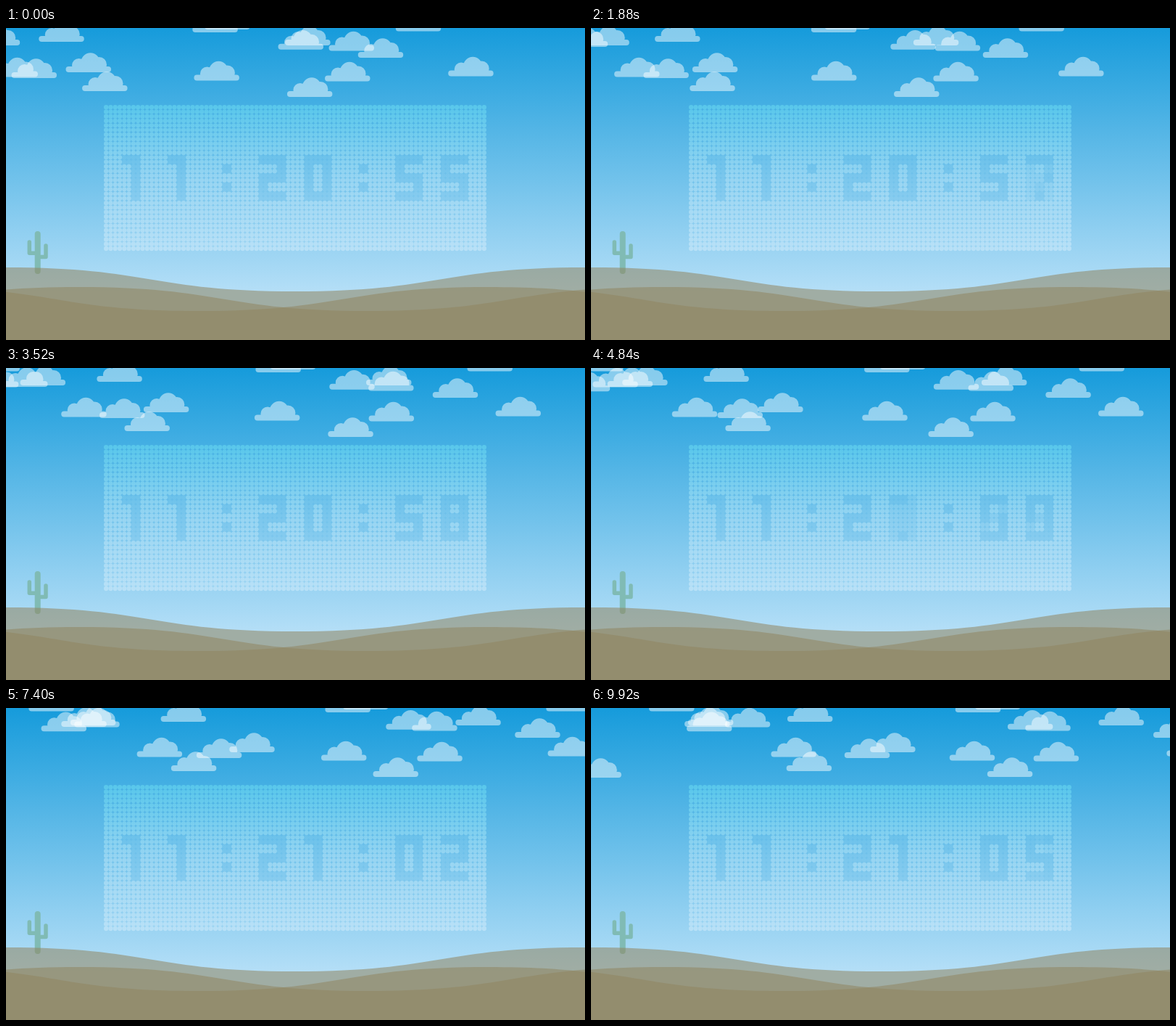
These frames come from a looping animation (799x430 px, 10 s). An HTML page with a canvas:

```html
<!DOCTYPE html>
<html>
<head>
<meta charset="utf-8">
<style>
  html, body { margin: 0; height: 100%; overflow: hidden; }
  canvas { display: block; }
</style>
</head>
<body>
<canvas id="stage" width="799" height="430"></canvas>
<script>
const W = 799, H = 430, LOOP = 10;
const ctx = document.getElementById('stage').getContext('2d');

function gradient(y0, y1, ...colors) {
  const g = ctx.createLinearGradient(0, y0, 0, y1);
  colors.forEach((color, i) => g.addColorStop(i / (colors.length - 1), color));
  return g;
}
const sky = gradient(0, 365, '#169bdb', '#b5dff7');
const dotFill = gradient(106, 307, '#58c7eb', '#97d5f2', '#b9e1f7');

// Where each cloud is halfway through the loop, from slowest to fastest
const clouds = [
  [523, 31.5], [468, 95], [188, 87], [526, 73.5], [46, 24], [703, 66.5], [-15, 4.5], [476, 29.7],
  [26, 26], [-128, 96], [159, 19], [378, 72.5], [381, 6], [403, 2], [116, 67.5], [678, 4.5],
  [632, 41], [235, 61], [544, 24], [-31, 32.3], [180, 69], [8, 26.5]
];
const cloudSpeed = rank => 15.5 + .5 * rank + .0225 * rank * rank;

const cloudShape = new Path2D();
cloudShape.roundRect(0, -8, 62.5, 8, 4);
for (const [x, y, r] of [[18, -9.5, 9.5], [34, -13.5, 13.2], [46, -10.5, 10.5]]) {
  cloudShape.moveTo(x + r, y);
  cloudShape.arc(x, y, r, 0, 7);
}

function drawClouds(t) {
  ctx.fillStyle = 'rgba(255,255,255,.48)';
  clouds.forEach(([x, y], rank) => {
    ctx.save();
    ctx.translate(x + cloudSpeed(rank) * (t - LOOP / 2), y);
    ctx.fill(cloudShape);
    ctx.restore();
  });
}

// A hill is a rolling wave as long as the stage, with a crest at the given point
function drawHill(crestX, crestY) {
  const half = W / 2, mid = half / 2;
  ctx.beginPath();
  ctx.moveTo(crestX - W, H);
  ctx.lineTo(crestX - W, crestY);
  for (let x = crestX - W, y = crestY; x < W; x += half) {
    const next = y === crestY ? crestY + 33 : crestY;
    ctx.bezierCurveTo(x + mid, y, x + mid, next, x + half, next);
    y = next;
  }
  ctx.lineTo(2 * W, H);
  ctx.fill();
}

function drawCactus() {
  ctx.strokeStyle = '#80bbb4';
  ctx.lineCap = ctx.lineJoin = 'round';
  ctx.lineWidth = 8;
  ctx.stroke(new Path2D('M43.7 284V335'));
  ctx.lineWidth = 5.5;
  ctx.stroke(new Path2D('M32.3 295V310.3H43.7M43.7 315.5H55V300'));
}

// Dot matrix clock; glyphs are 3 x 5 cells, one octal digit per row, each cell 2 x 2 dots
const PITCH = 44 / 7, COLS = 84, ROWS = 32, LEFT = 135, TOP = 106;
const DIGITS = '75557 62222 71747 71717 55711 74717 74757 71122 75757 75717'.split(' ');
const COLON = '02020';
const START = 11 * 3600 + 20 * 60 + 55, TICK = .7, FADE = .27;
const pad = n => String(Math.floor(n)).padStart(2, '0');
const clock = s => [s / 3600, s / 60 % 60, s % 60].map(pad).join(':');

function isLit(text, col, row) {
  const c = col - 4, r = row - 11;
  if (c < 0 || c % 10 > 5 || r < 0 || r > 9) return 0;
  const char = text[Math.floor(c / 10)];
  if (!char) return 0;
  const glyph = DIGITS[char] || COLON;
  return glyph[r >> 1] >> (2 - (c % 10 >> 1)) & 1;
}

function drawClock(t) {
  const ticks = Math.floor(t - TICK);
  const mix = Math.min(1, (t - TICK - ticks) / FADE);
  const before = clock(START + ticks), after = clock(START + ticks + 1);
  ctx.fillStyle = dotFill;
  for (let row = 0; row < ROWS; row++) {
    for (let col = 0; col < COLS; col++) {
      const lit = isLit(before, col, row) * (1 - mix) + isLit(after, col, row) * mix;
      ctx.globalAlpha = 1 - .72 * lit;
      ctx.beginPath();
      ctx.arc(LEFT + (col + .5) * PITCH, TOP + (row + .5) * PITCH, PITCH / 2, 0, 7);
      ctx.fill();
    }
  }
  ctx.globalAlpha = 1;
}

function draw(now) {
  const t = now / 1000 % LOOP;
  ctx.fillStyle = sky;
  ctx.fillRect(0, 0, W, H);
  drawClouds(t);
  drawCactus();
  ctx.fillStyle = 'rgba(144,133,97,.55)';
  drawHill(0, 330);
  drawHill(100, 357);
  drawHill(666, 357);
  drawClock(t);
  requestAnimationFrame(draw);
}
requestAnimationFrame(draw);
</script>
</body>
</html>
```
